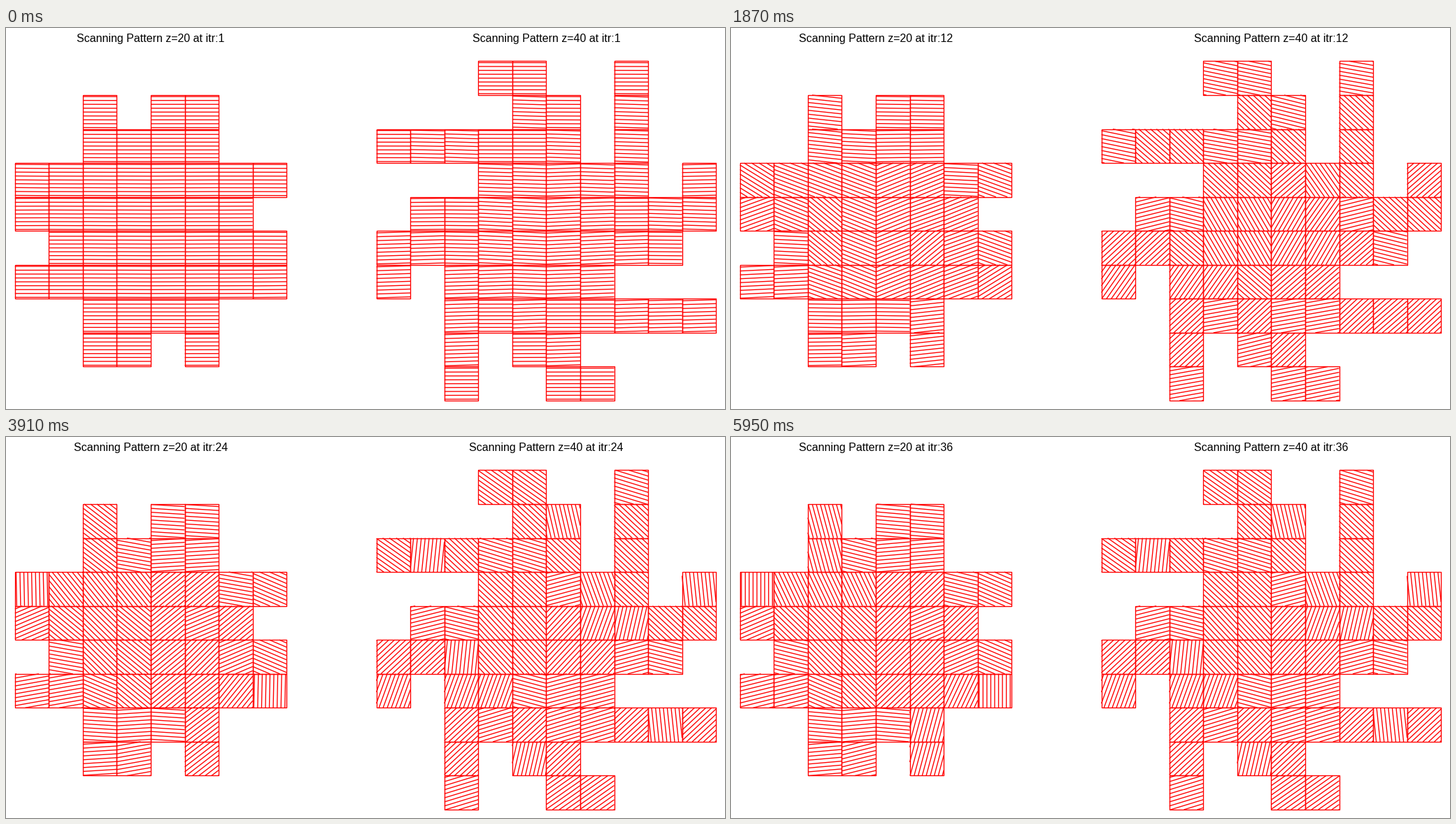
Recreate the animation shown at these times as a matplotlib script. Size 1028 px wide and 545 px high, loop 6120 ms.

```python
import numpy as np
import matplotlib.pyplot as plt
from matplotlib.animation import FuncAnimation
from matplotlib.collections import LineCollection

W, H, DPI = 1028, 545, 100
PX = 72 / DPI          # points per pixel
CELL = 48.56
HATCH = 5.55
STEPS = 36
STYLE = dict(colors="#ff0000", linewidths=1.35 * PX)

# Each letter names how a cell's hatch turns; capitals rise to the right,
# small letters fall.
LEFT_GRID = """
..s.ll..
..shLL..
vtttMMhg
GmfmMGM.
.hfmMFGg
HHgmMMTV
..lLlS..
..LH.S..
""".split()

RIGHT_GRID = """
...ll..s..
....du.d..
lvdssd.d..
...ddRtd.V
.GgccCTUdd
DDvccCCRg.
T.TTrRR...
..DSDSSDVD
..D.UD....
..S..LL...
""".split()

# kind: (first plateau in degrees, iteration at half of it, final angle)
LEFT_TURNS = dict(
    l=(2, 13, 5),        # almost level
    h=(6, 12.5, 14),     # shallow
    g=(23, 9, 23),       # gentle
    m=(35, 11, 44),      # diagonal
    f=(44, 8.7, 45),     # fast diagonal
    t=(41, 12, 65),      # steep
    s=(24, 15, 76),      # late and steep
    v=(90, 13.5, 90),    # vertical
)
RIGHT_TURNS = dict(
    s=(5, 8, 17),        # slow
    g=(14, 5, 14),       # gentle
    l=(3, 7, 35),        # late diagonal
    d=(43, 5, 43),       # fast diagonal
    c=(68, 5, 47),       # core, overshoots
    r=(50, 5.2, 15),     # relaxes again
    t=(47, 5.2, 70),     # steep
    u=(9, 6, 77),        # late and steep
    v=(36, 6.5, 96),     # past vertical
)


def sigmoid(x):
    return 1 / (1 + np.exp(-x))


def hatch(cx, cy, degrees):
    """Parallel lines through the cell centre, clipped to the square."""
    a = np.radians(degrees)
    u = np.array([np.cos(a), -np.sin(a)]) + 1e-9
    normal = np.array([u[1], -u[0]])
    half = CELL / 2
    lines = []
    for n in range(-6, 7):
        p = n * HATCH * normal
        t = np.sort([(-half - p) / u, (half - p) / u], axis=0)
        lo, hi = t[0].max(), t[1].min()
        if lo < hi:
            c = p + (cx, cy)
            lines.append((c + lo * u, c + hi * u))
    return lines


class Panel:
    def __init__(self, ax, grid, turns, x, y, z, spread, late, late_width):
        self.z, self.turns = z, turns
        self.spread, self.late, self.late_width = spread, late, late_width
        self.cells = [(x + c * CELL, y + r * CELL, kind)
                      for r, row in enumerate(grid)
                      for c, kind in enumerate(row) if kind != "."]
        boxes = [[(px, py), (px + CELL, py), (px + CELL, py + CELL),
                  (px, py + CELL), (px, py)] for px, py, _ in self.cells]
        self.lines = ax.add_collection(LineCollection([], **STYLE))
        ax.add_collection(LineCollection(boxes, **STYLE))
        self.title = ax.text(x + len(grid[0]) * CELL / 2, 20, "",
                             ha="center", va="baseline",
                             family="Liberation Sans", size=16 * PX)

    def angle(self, kind, itr):
        plateau, half, end = self.turns[kind.lower()]
        change = end - plateau
        # larger second turns settle later
        late = self.late + abs(change) / 18
        value = (plateau * sigmoid((itr - half) / (self.spread * half))
                 + change * sigmoid((itr - late) / self.late_width))
        return value if kind.isupper() else -value

    def draw(self, itr):
        segments = []
        for px, py, kind in self.cells:
            segments += hatch(px + CELL / 2, py + CELL / 2,
                              self.angle(kind, itr))
        self.lines.set_segments(segments)
        self.title.set_text(f"Scanning Pattern z={self.z} at itr:{itr}")


fig = plt.figure(figsize=(W / DPI, H / DPI), dpi=DPI, facecolor="white")
ax = fig.add_axes([0, 0, 1, 1])
ax.set(xlim=(0, W), ylim=(H, 0))
ax.axis("off")

TOP = 47.45
panels = [
    Panel(ax, LEFT_GRID, LEFT_TURNS, 12.8, TOP + CELL, 20, 0.18, 23.5, 2.5),
    Panel(ax, RIGHT_GRID, RIGHT_TURNS, 529.6, TOP, 40, 0.25, 11.5, 1.3),
]


def update(i):
    for panel in panels:
        panel.draw(i + 1)
    return []


anim = FuncAnimation(fig, update, frames=STEPS, init_func=lambda: update(0),
                     interval=170, repeat=True, repeat_delay=0)
plt.show()
```
